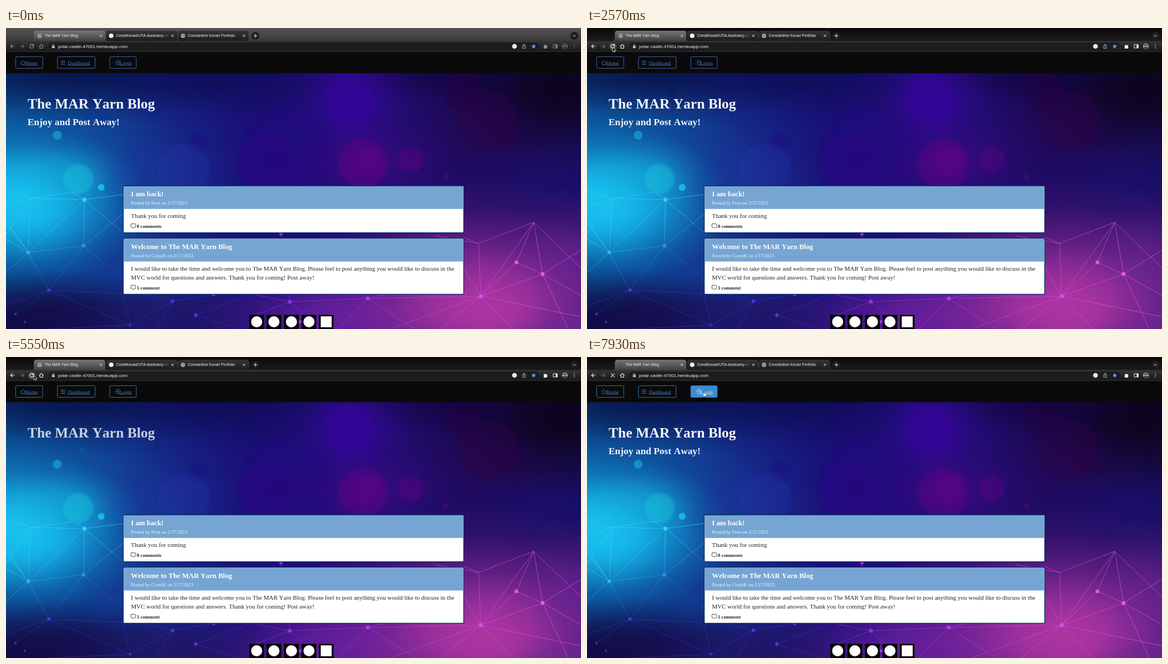
Write an HTML page that moves like this. It is 1033 px wide and 542 px high and loops after 8000 ms.

```html
<!DOCTYPE html>
<html lang="en">
<head>
<meta charset="utf-8">
<title>Blog reload</title>
<style>
html, body { margin: 0; width: 100%; height: 100%; overflow: hidden; background: #0a0a0a; }
svg { display: block; width: 1033px; height: 542px; }
text { font-kerning: none; }
.ui { font-family: "Liberation Sans", Arial, sans-serif; fill: #f4f4f4; }
.serif { font-family: "Liberation Serif", "Times New Roman", serif; }
.line { fill: none; stroke-linecap: round; stroke-linejoin: round; }
</style>
</head>
<body>
<svg id="stage" viewBox="0 0 1033 542" xmlns="http://www.w3.org/2000/svg">
  <defs id="defs">
    <linearGradient id="sky">
      <stop offset="0" stop-color="#0a4088"/><stop offset=".2" stop-color="#12348c"/>
      <stop offset=".42" stop-color="#1a1078"/><stop offset=".62" stop-color="#240c78"/>
      <stop offset=".8" stop-color="#1f0b62"/><stop offset="1" stop-color="#1a0d5c"/>
    </linearGradient>
    <linearGradient id="stripOff" x2="0" y2="1"><stop stop-color="#545454"/><stop offset="1" stop-color="#393939"/></linearGradient>
    <linearGradient id="stripOn" x2="0" y2="1"><stop stop-color="#0a0a0a"/><stop offset="1" stop-color="#1b1b1b"/></linearGradient>
    <linearGradient id="tabFill" x2="0" y2="1"><stop stop-color="#757575"/><stop offset="1" stop-color="#3f3f3f"/></linearGradient>
    <linearGradient id="idleTab" x2="0" y2="1"><stop stop-color="#333"/><stop offset="1" stop-color="#1c1c1c"/></linearGradient>
    <linearGradient id="barFill" x2="0" y2="1"><stop stop-color="#353535"/><stop offset="1" stop-color="#191919"/></linearGradient>
    <linearGradient id="fade" gradientUnits="userSpaceOnUse" x1="278" x2="292"><stop stop-color="#fff"/><stop offset="1" stop-color="#fff" stop-opacity=".1"/></linearGradient>
    <linearGradient id="coolNet" gradientUnits="userSpaceOnUse" x1="0" y1="395" x2="35" y2="490">
      <stop stop-color="#3cd0f6"/><stop offset=".5" stop-color="#2b8be4"/><stop offset="1" stop-color="#4a36d2"/>
    </linearGradient>
    <linearGradient id="warmNet" gradientUnits="userSpaceOnUse" x1="300" y1="0" x2="960" y2="0">
      <stop stop-color="#4c32d4"/><stop offset=".4" stop-color="#a232e4"/><stop offset="1" stop-color="#f058e2"/>
    </linearGradient>
    <filter id="soft" x="-20%" y="-20%" width="140%" height="140%"><feGaussianBlur stdDeviation="2"/></filter>
    <clipPath id="pageClip"><rect y="81" width="1033" height="461"/></clipPath>
  </defs>
  <rect width="1033" height="542" fill="#0a0a0a"/>
  <g clip-path="url(#pageClip)">
    <rect y="81" width="1033" height="461" fill="url(#sky)"/>
    <g id="glows"></g>
    <g id="bokeh"></g>
    <g id="net"></g>
  </g>
  <g id="page" class="serif"></g>
  <g id="nav" class="serif"></g>
  <g id="chrome"></g>
  <g id="arrow"><path d="M0 0V8.4L1.9 6.7L3.2 9.6L4.6 9L3.4 6.2H6Z" fill="#0a0a0a" stroke="#eee" stroke-width=".8"/></g>
  <g id="hand"><path d="M-.9 .2Q0-.9 .8.2V3.2L3.8 4Q4.5 4.3 4.3 5.2L3.6 8.2H-1.2L-3.5 4.9Q-3.3 3.7-2.2 4.3L-.9 5.4Z" fill="#fff" stroke="#222" stroke-width=".6"/></g>
</svg>
<script>
const LOOP = 8000;
const $ = id => document.getElementById(id);
const blog = "The MAR Yarn Blog";

const text = (x, y, size, str, attrs = "") =>
  `<text x="${x}" y="${y}" font-size="${size}" ${attrs}>${str}</text>`;
const rect = (x, y, w, h, fill, attrs = "") =>
  `<rect x="${x}" y="${y}" width="${w}" height="${h}" fill="${fill}" ${attrs}/>`;
const circle = (x, y, r, fill, attrs = "") =>
  `<circle cx="${x}" cy="${y}" r="${r}" fill="${fill}" ${attrs}/>`;
const line = (d, color, w = 1, attrs = "") =>
  `<path class="line" d="${d}" stroke="${color}" stroke-width="${w}" ${attrs}/>`;
const bold = 'font-weight="700"';

// ---- backdrop ----
let glowCount = 0;
function glow(x, y, rx, ry, color, alpha = 1) {
  const id = "glow" + glowCount++;
  const stops = [[0, 1], [.25, .86], [.5, .5], [.75, .15], [1, 0]]
    .map(([o, a]) => `<stop offset="${o}" stop-color="${color}" stop-opacity="${(a * alpha).toFixed(3)}"/>`).join("");
  $("defs").insertAdjacentHTML("beforeend", `<radialGradient id="${id}">${stops}</radialGradient>`);
  $("glows").insertAdjacentHTML("beforeend",
    `<ellipse cx="${x}" cy="${y}" rx="${rx}" ry="${ry}" fill="url(#${id})"/>`);
}
glow(0, 290, 330, 230, "#0e84c4", .85);
glow(100, 75, 330, 105, "#081448", .9);
glow(370, 75, 320, 110, "#0c0a50", .8);
glow(40, 320, 220, 140, "#14b8ec", .9);
glow(10, 310, 150, 110, "#1accf4", .6);
glow(110, 265, 110, 70, "#14a8d8", .5);
glow(290, 260, 140, 90, "#1e349e", .45);
glow(0, 550, 330, 125, "#0f083a", 1);
glow(110, 520, 230, 85, "#150c4c", .85);
glow(330, 530, 240, 90, "#221262", .8);
glow(620, 130, 110, 110, "#3806a0", .75);
glow(1000, 110, 290, 150, "#0c041e", 1);
glow(800, 82, 190, 70, "#100540", .75);
glow(860, 180, 140, 90, "#260748", .5);
glow(985, 285, 190, 80, "#190f6c", .7);
glow(650, 240, 150, 80, "#480a84", .55);
glow(600, 525, 260, 120, "#6a20a0", .85);
glow(860, 480, 350, 215, "#98309e", .9);
glow(860, 510, 230, 120, "#b838a4", .75);
glow(1030, 430, 140, 150, "#76289e", .5);
glow(1030, 545, 130, 70, "#702898", .6);

$("bokeh").innerHTML = `<g filter="url(#soft)">` + [
  [130, 272, 27, "#1cc8dc", .4], [320, 256, 48, "#2636b4", .2], [345, 207, 18, "#1a1684", .25],
  [470, 245, 55, "#3c0a94", .22], [487, 237, 20, "#260a70", .35], [505, 230, 85, "#2a0a88", .2],
  [615, 130, 48, "#3e08ac", .15], [641, 244, 44, "#640a86", .42], [650, 240, 26, "#6e0a84", .2],
  [728, 237, 23, "#640c84", .38], [820, 112, 34, "#260644", .35], [866, 165, 54, "#330846", .25],
  [897, 185, 34, "#300846", .2]
].map(([x, y, r, c, a]) => circle(x, y, r, c, `opacity="${a}"`)).join("") + "</g>" + [
  [92, 193, 8, "#18a0c4", .75], [171, 287, 6, "#19c4ec", .85], [137, 168, 6, "#1664a4", .3],
  [154, 119, 6, "#1a1450", .5], [790, 268, 6, "#5c0c74", .4], [382, 117, 6, "#221080", .3]
].map(([x, y, r, c, a]) => circle(x, y, r, c, `opacity="${a}"`)).join("");

const dots = (pts, fill) => pts.map(([x, y, r]) => circle(x, y, r, fill)).join("");
$("net").innerHTML =
  line(`M0 293L45 307L120 296L141 309L45 307L40 404L141 309L139 392L40 404L77 472L139 392
    M0 345L40 404L0 380M0 440L40 404M0 372L45 307L0 322M141 309L210 368M141 309L210 300
    M139 392L210 335M139 392L210 452M40 404L0 352`, "url(#coolNet)", .9, 'opacity=".72"') +
  line(`M77 472L223 535L210 478L77 472L0 500M77 472L17 515M223 535L299 492L373 480M223 535L77 542
    M299 492L210 470M299 492L270 542M341 517L420 542M341 517L437 480`, "#4a36d2", .8, 'opacity=".6"') +
  line(`M948 350L849 388L853 483L948 350L917 422L964 443L948 350L1033 432M849 388L822 377M849 388L770 374
    M917 422L853 483L964 443L1033 400M964 443L1033 482M964 443L1010 542M853 483L650 487L510 493L445 480
    M853 483L822 432M853 483L1033 520M853 483L780 542M853 483L910 542M650 487L596 542M650 487L735 542
    M650 487L680 480M510 493L566 542M510 493L440 520M853 483L690 542M510 493L494 372`,
    "url(#warmNet)", .9, 'opacity=".65"') +
  dots([[141, 309, 3.4], [40, 404, 3.2], [139, 392, 3.2], [77, 472, 3]], "url(#coolNet)") +
  dots([[17, 515, 2.4], [34, 529, 2.2], [223, 535, 2.8]], "#3a2cae") +
  dots([[299, 492, 3.2], [341, 517, 3.2], [373, 480, 3], [510, 493, 3.4], [650, 487, 3.4], [494, 371, 3],
    [528, 529, 3], [853, 483, 3.6], [917, 422, 3.4], [964, 443, 3.4]], "url(#warmNet)");

// ---- page ----
function card(y, h, title, by, body, comments) {
  const foot = y + h - 17.5;
  return rect(210, y, 613, h, "#0a2d66", 'rx="3"') +
    rect(211.4, y + 1.6, 610.2, h - 2.900, "#fff", 'rx="1.5"') +
    rect(211.4, y + 1.6, 610.2, 40.9, "#76a5d3") +
    text(224.5, y + 20, 12.75, title, bold + ' fill="#fff"') +
    text(224.5, y + 35, 8.75, `Posted by ${by} on 2/17/2023`, 'fill="#eef4fa"') +
    body.map((s, i) => text(224.5, y + 58.5 + i * 16.2, 11, s, 'fill="#212529"')).join("") +
    line(`M225.5 ${foot + .8}h6.4q1 0 1 1v4.4q0 1-1 1h-1.8l-1.4 1.6l-1.4-1.6h-1.8q-1 0-1-1v-4.4q0-1 1-1Z`, "#212529", .8) +
    text(235, foot + 8.4, 8.75, comments, bold + ' fill="#212529"');
}
const social = [437, 468, 499.5, 531, 562].map((x, i) =>
  rect(x, 516.5, 26.5, 26, "#060606") +
  (i < 4 ? circle(x + 13.3, 529, 10, "#fff") : rect(x + 3.5, 519.2, 19.6, 19.6, "#fff"))).join("");

$("page").innerHTML =
  `<g fill="#f3f5fb" ${bold}>` +
  text(38.8, 145, 25.5, blog, 'id="title"') +
  text(38.8, 175, 17.35, "Enjoy and Post Away!", 'id="sub"') + "</g>" +
  card(283.3, 86, "I am back!", "Fern", ["Thank you for coming"], "0 comments") +
  card(378, 102, "Welcome to " + blog, "ConstK", [
    `I would like to take the time and welcome you to ${blog}. Please feel to post anything you would like to discuss in the`,
    "MVC world for questions and answers. Thank you for coming! Post away!"], "1 comment") + social;

const button = (x, w, id) =>
  `<rect id="${id}" x="${x}" y="51.700" width="${w}" height="21" rx="2" fill="#3b8bd0" fill-opacity="0" stroke="currentColor" stroke-width=".9"/>`;
const link = (x, s) => text(x, 65.5, 9.15, s, 'fill="currentColor" text-decoration="underline"');
$("nav").innerHTML = rect(0, 42, 1033, 39.5, "#0a0a0a") +
  button(17.4, 48.6, "homeBtn") + link(35, "Home") +
  line("M26.6 62.6L30.6 58.6L34.6 62.6M27.6 62V66H33.6V62", "currentColor", .9) +
  button(92.4, 67.6, "dashBtn") + link(111, "Dashboard") +
  line("M99 59.5h7M99 62.5h7M99 65.5h7", "currentColor", 1.2) +
  button(186.4, 47.6, "loginBtn") +
  `<g id="loginText">${line("M198.6 60V58.6H203.6V66H198.6V64.8M196 62.3H201M199.4 60.6L201.2 62.3L199.4 64", "currentColor", .8)}${link(204, "Login")}</g>`;

// ---- browser frame ----
const globe = x => circle(x, 14, 3.9, "#a9adb2") +
  line(`M${x - 3} 12.6q2 .2 2.2 1.8t2 1.2M${x + .4} 10.6q-.6 1.8 1 2t1.8 1.6`, "#4a4a4a", .9);
const close = x => line(`M${x - 1.8} 12.2l3.6 3.6m0-3.6l-3.6 3.6`, "#f0f0f0", .9);

$("chrome").innerHTML =
  rect(0, 0, 1033, 24, "url(#stripOn)") +
  `<g id="off">${rect(0, 0, 1033, 24, "url(#stripOff)")}</g>` +
  rect(180, 5, 128, 19, "url(#idleTab)", 'rx="4"') + rect(309, 5, 127, 19, "url(#idleTab)", 'rx="4"') +
  `<path d="M46 24Q50 24 50 20V9.5Q50 5 54.5 5H174.5Q178.5 5 178.5 9.5V20Q178.5 24 182.5 24Z" fill="url(#tabFill)"/>` +
  rect(0, 23.5, 1033, 18.5, "url(#barFill)") + rect(76, 26, 882, 14, "#1d1d1d", 'rx="7"') +
  rect(0, 41.8, 1033, .9, "#3c3c3c") +
  line("M308.5 9V19M436 9V19", "#555", .7) +
  `<g class="ui"><g id="favicon">${globe(60.5)}</g>${circle(189, 14, 4.1, "#f0f0f0")}${globe(318)}` +
  text(69.2, 16.4, 6.75, blog) +
  text(198, 16.4, 6.85, "ConstKovari/UTA-bootcamp-ch", 'fill="url(#fade)"') +
  text(326.5, 16.4, 6.85, "Constantine Kovari Portfolio") +
  text(93.5, 35.7, 8.08, "polar-castle-47001.herokuapp.com") + "</g>" +
  line("M59.3 10.3h1.4", "#222", 1, 'id="spinner"') +
  close(170.5) + close(299) + close(427.5) +
  circle(448, 14, 7, "#1d1d1d") + line("M448 11v6M445 14h6", "#eee", 1) +
  circle(1021, 14, 7.3, "#1d1d1d") + line("M1018.6 13l2.4 2.4l2.4-2.4", "#eee", 1) +
  circle(46.4, 33.4, 7, "#4a4a4a", 'id="halo"') +
  `<g id="tools">` +
  line("M15 33H8.3M11.3 29.9L8.2 33L11.3 36.1", "#f2f2f2", 1.1) +
  line("M59.9 33L63.4 29.6L66.9 33M60.9 32.6V36.5H65.9V32.6", "#f2f2f2", 1.1) +
  `<path d="M966 31h1.8q.5-2 1.7 0H972v2.2q2 .6 0 1.8V37h-6v-2q1.7-.8 0-1.8Z" fill="#f2f2f2"/>` +
  line("M983.5 30h6.8v6h-6.8Z", "#f2f2f2", 1) + rect(987.5, 30, 3, 6, "#f2f2f2") +
  circle(1004, 33, 5.2, "#a9a29c") + `<path d="M999.3 35.2q4.7-3 9.4 0a5.2 5.2 0 0 1-9.4 0Z" fill="#4c4340"/>` +
  rect(1000.5, 29.2, 7, 3, "#5b5048", 'rx="1.5"') +
  [30, 33, 36].map(y => circle(1021, y, .8, "#f2f2f2")).join("") + "</g>" +
  line("M25.5 33H32.2M29.2 29.9L32.3 33L29.2 36.1", "#6b6b6b", 1.1) +
  line("M49.3 31.3A3.4 3.4 0 1 0 49.6 34M49.7 29.7V31.9H47.5", "#f2f2f2", 1.1, 'id="reload"') +
  line("M43.5 30.2l5.6 5.6m0-5.6l-5.6 5.6", "#f2f2f2", 1.1, 'id="stop"') +
  rect(82.6, 32.2, 4.8, 4, "#c4c4c4", 'rx=".5"') + line("M83.7 32v-1a1.3 1.3 0 0 1 2.6 0v1", "#c4c4c4", .9) +
  circle(913.5, 33, 4.3, "#e4ebf8") +
  line("M929.3 31.7h-1.1v5h5.2v-5h-1.1M930.8 34.5V29.2M929.2 30.7l1.6-1.6l1.6 1.6", "#c0c0c0", .8) +
  `<path d="M948 28.7l1.25 2.8l3 .3l-2.25 2l.65 3l-2.65-1.55l-2.65 1.55l.65-3l-2.25-2l3-.3Z" fill="#5b9cf0"/>`;

// ---- motion: time, x, y ----
const path = [[520, 603, 6], [600, 612, 11], [760, 612, 11], [1100, 330, 25], [1530, 74, 34],
  [1840, 57.3, 34], [2170, 46, 34.3], [3860, 46, 34], [3950, 50, 32.8], [5700, 50, 32.8],
  [6870, 45, 34], [7250, 120, 47], [7600, 210.5, 62.5], [8000, 210.5, 62.5]];

function pointer(t) {
  const i = path.findIndex(k => k[0] > t);
  if (i < 1) return path[0].slice(1);
  const [t0, x0, y0] = path[i - 1], [t1, x1, y1] = path[i];
  const p = (t - t0) / (t1 - t0);
  return [x0 + (x1 - x0) * p, y0 + (y1 - y0) * p];
}
const clamp = v => Math.max(0, Math.min(1, v));
const within = (t, a, b) => t >= a && t < b;
const fadeIn = (t, a, b) => 1 - Math.pow(1 - clamp((t - a) / (b - a)), 1.7);
const show = (id, on) => $(id).setAttribute("opacity", +on);

function draw(t) {
  const active = t >= 2570, reloaded = t >= 3030;
  const loading = within(t, 3030, 4520), leaving = t >= 7840;
  show("off", !active);
  show("tools", active ? 1 : .5);
  show("halo", within(t, 2570, 3030) || within(t, 4670, 5700) ? .8 : 0);
  show("reload", loading || leaving ? 0 : active ? 1 : .55);
  show("stop", leaving ? 1 : loading ? .4 : 0);
  show("favicon", !leaving);
  show("spinner", leaving);
  show("title", reloaded ? fadeIn(t, 5160, 5780) : 1);
  show("sub", reloaded ? fadeIn(t, 6090, 6710) : 1);

  const hover = clamp((t - 7450) / 150);
  const linkColor = reloaded ? "#3d80c4" : "#4a6fbe";
  $("nav").setAttribute("color", linkColor);
  $("loginBtn").setAttribute("fill-opacity", hover);
  $("loginText").setAttribute("color", hover > .4 ? "#d4e6f8" : linkColor);

  const [x, y] = pointer(t);
  const pos = `translate(${x.toFixed(2)} ${y.toFixed(2)})`;
  const visible = within(t, 520, 5700) || t >= 6870;
  $("arrow").setAttribute("transform", pos);
  $("hand").setAttribute("transform", pos);
  show("arrow", visible && hover === 0);
  show("hand", hover > 0);
}

const start = performance.now();
function tick() {
  draw((performance.now() - start) % LOOP);
  requestAnimationFrame(tick);
}
draw(0);
requestAnimationFrame(tick);
</script>
</body>
</html>
```
